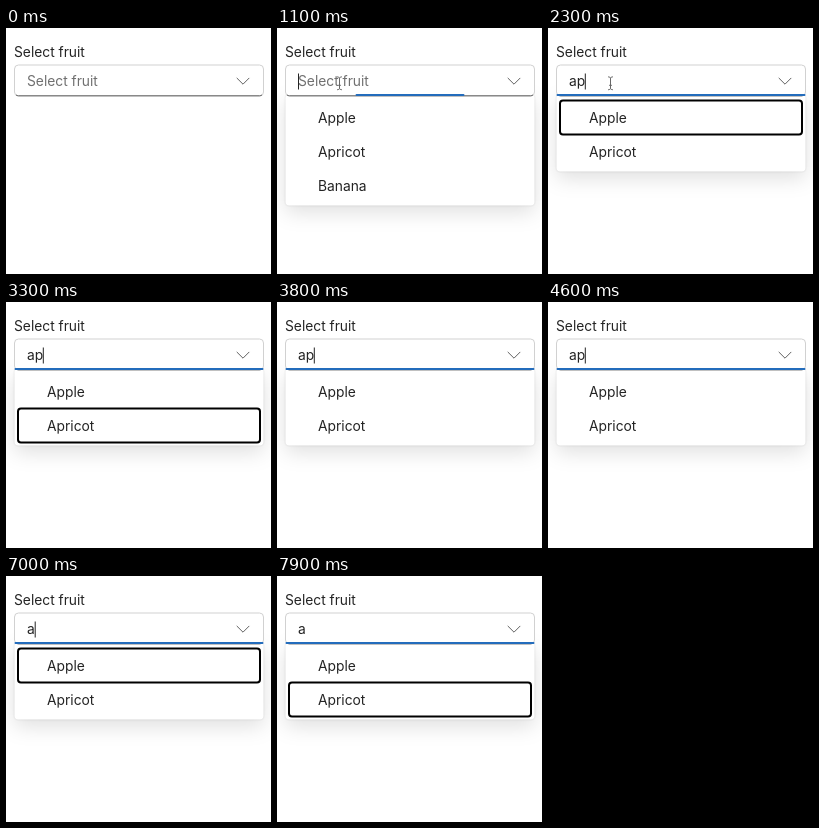
An HTML page that plays this animation: 265 by 246 pixels, repeating every 8 s.

```html
<!DOCTYPE html>
<html lang="en">
<head>
<meta charset="utf-8">
<title>Fruit combobox</title>
<style>
  html, body { margin: 0; width: 100%; height: 100%; overflow: hidden; background: #fff; }
  svg { display: block; width: 265px; height: 246px; }
  text { font: 13.8px Inter, "Open Sans", sans-serif; fill: #242424; }
  #hint { fill: #707070; }
  #popup { fill: #fff; filter: drop-shadow(0 0 1px rgba(0,0,0,.14)) drop-shadow(0 7px 10px rgba(0,0,0,.12)); }
</style>
</head>
<body>
<svg viewBox="0 0 265 246">
  <text x="8" y="29.4">Select fruit</text>

  <g id="list">
    <rect id="popup" x="8.5" y="66.5" width="249" rx="4"/>
    <text x="41" y="94.6">Apple</text>
    <text x="41" y="128.6">Apricot</text>
    <text id="third" x="41" y="162.6">Banana</text>
    <rect id="ring" x="12" width="242" height="34" rx="3" fill="none" stroke="#000" stroke-width="2"/>
  </g>

  <rect x="8.5" y="37" width="249" height="31" rx="4" fill="#fff" stroke="#d1d1d1"/>
  <path d="M10 66.9Q11 67.8 12.5 67.8H253.5Q255 67.8 256 66.9" fill="none" stroke="#616161"/>
  <rect id="line" x="8.5" y="66" width="249" height="2" rx="1" fill="#236cbc"/>
  <path d="M231 50.2l6 6 6-6" fill="none" stroke="#616161" stroke-linecap="round" stroke-linejoin="round"/>
  <text id="hint" x="21" y="58">Select fruit</text>
  <text id="typed" x="21" y="58"></text>
  <rect id="caret" y="45.5" width="1" height="16" fill="#242424"/>

  <g id="pointer">
    <path id="arrow" d="M0 0V13.5L3.2 10.6 5.2 15.2 7.5 14.2 5.5 9.8H9.6Z" fill="#000" stroke="#fff" stroke-width="1"/>
    <g id="beam" fill="none">
      <path d="M-2.5-6.5Q0-6.5 0-5V5Q0 6.5-2.5 6.5M2.5-6.5Q0-6.5 0-5V5Q0 6.5 2.5 6.5M-1.5 2H1.5" stroke="#fff" stroke-width="2"/>
      <path d="M-2.5-6.5Q0-6.5 0-5V5Q0 6.5-2.5 6.5M2.5-6.5Q0-6.5 0-5V5Q0 6.5 2.5 6.5M-1.5 2H1.5" stroke="#666" stroke-width=".9"/>
    </g>
  </g>
</svg>
<script>
const LOOP = 8000, STEP = 100, OPEN = 1100, FILTER = 1800, HIDE = 2700;
const $ = id => document.getElementById(id);
const show = (id, on) => { $(id).style.display = on ? "" : "none"; };

// Each step: time, typed text, highlighted row (-1: none), caret index (-1: hidden)
const steps = [
  [0, "", -1, -1],
  [1100, "", -1, 0],
  [1600, "", -1, -1],
  [1800, "a", 0, 1],
  [2300, "ap", 0, 2],
  [2700, "ap", 1, 2],
  [2800, "ap", 1, -1],
  [3300, "ap", 1, 2],
  [3600, "ap", -1, 1],
  [3800, "ap", -1, 2],
  [4200, "ap", 0, 2],
  [4600, "ap", -1, 2],
  [4700, "ap", 0, 2],
  [4900, "ap", -1, 2],
  [5400, "ap", -1, -1],
  [5900, "ap", 0, 2],
  [6100, "ap", -1, 2],
  [6400, "ap", -1, 1],
  [6700, "ap", -1, 2],
  [7000, "a", 0, 1],
  [7500, "a", 0, -1],
  [7700, "a", 1, -1]
];
const caretX = [21, 28.7, 36.8];
const clamp = v => Math.max(0, Math.min(1, v));
const easeOut = v => 1 - (1 - v) ** 2;

function movePointer(t) {
  const k = easeOut(clamp((t - 100) / 500));
  const x = 121 + (62.5 - 121) * k, y = 143 + (55.3 - 143) * k;
  const inField = y < 69;
  show("pointer", t >= 100 && t < HIDE);
  show("arrow", !inField);
  show("beam", inField);
  $("pointer").setAttribute("transform", `translate(${x} ${y})`);
}

function draw(time) {
  const t = Math.floor(time / STEP) * STEP;
  const [, text, row, caret] = steps.findLast(s => s[0] <= t);
  const full = t < FILTER;

  show("list", t >= OPEN);
  show("third", full);
  $("popup").setAttribute("height", full ? 111 : 77);

  show("ring", row >= 0);
  $("ring").setAttribute("y", 72.5 + 34 * Math.max(row, 0));

  const grow = easeOut(clamp((t - OPEN + STEP) / 400));
  $("line").setAttribute("x", 133 - 124.5 * grow);
  $("line").setAttribute("width", 249 * grow);

  show("hint", !text);
  $("typed").textContent = text;
  show("caret", caret >= 0);
  $("caret").setAttribute("x", caretX[Math.max(caret, 0)]);

  movePointer(t);
}

const start = performance.now();
function tick() {
  draw((performance.now() - start) % LOOP);
  requestAnimationFrame(tick);
}
tick();
</script>
</body>
</html>
```
